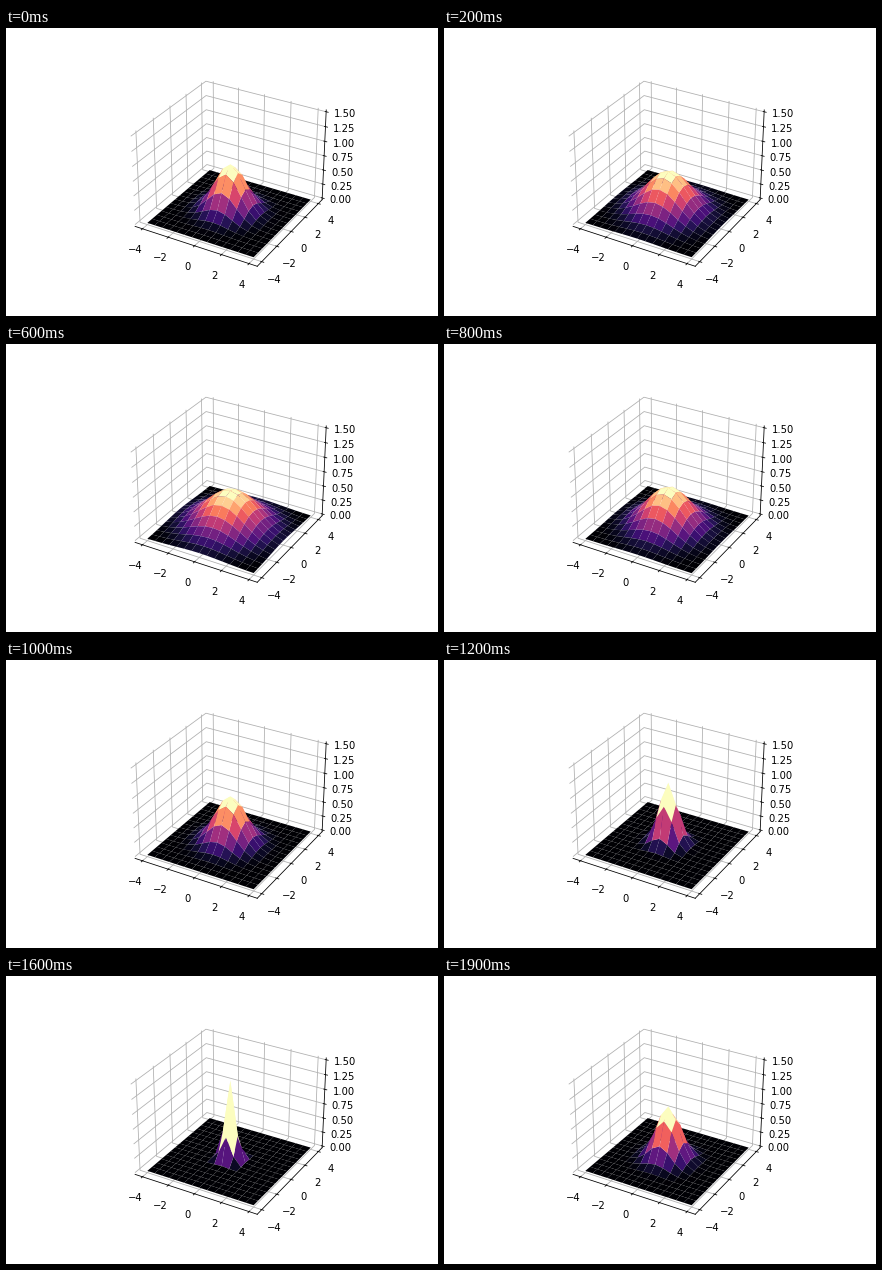
Recreate the animation shown at these times as a matplotlib script. Size 432x288 px, loop 2 s.

```python
import matplotlib.pyplot as plt
import numpy as np
from matplotlib.animation import FuncAnimation

FRAMES = 20
CELLS = 14
PAD = 1 / 48  # gap between the axis limits and the panes

fig = plt.figure(figsize=(6, 4), dpi=72, facecolor="white")
fig.subplots_adjust(left=0.125, right=0.9, bottom=0.125, top=0.88)
ax = fig.add_subplot(projection="3d")

side = np.linspace(-4, 4, CELLS + 1)
x, y = np.meshgrid(side, side)


def padded(low, high):
    gap = (high - low) * PAD
    return low - gap, high + gap


def bell(width):
    return np.exp(-(x**2 + y**2) / width**2) / np.sqrt(width)


def setup():
    ax.set_xlim(*padded(-4.4, 4.4))
    ax.set_ylim(*padded(-4.4, 4.4))
    ax.set_zlim(*padded(0, 1.5))
    ax.set_xticks(range(-4, 5, 2))
    ax.set_yticks(range(-4, 5, 2))
    ax.set_zticks(np.arange(0, 1.6, 0.25))
    for axis in (ax.xaxis, ax.yaxis, ax.zaxis):
        axis.set_pane_color((1, 1, 1, 1))


def update(i):
    for surface in list(ax.collections):
        surface.remove()
    width = 1.5 + np.sin(2 * np.pi * i / FRAMES)
    ax.plot_surface(x, y, bell(width), cmap="magma")
    return ax.collections


setup()
anim = FuncAnimation(fig, update, frames=FRAMES, init_func=lambda: update(0),
                     interval=100, repeat=True, repeat_delay=0)
plt.show()
```
